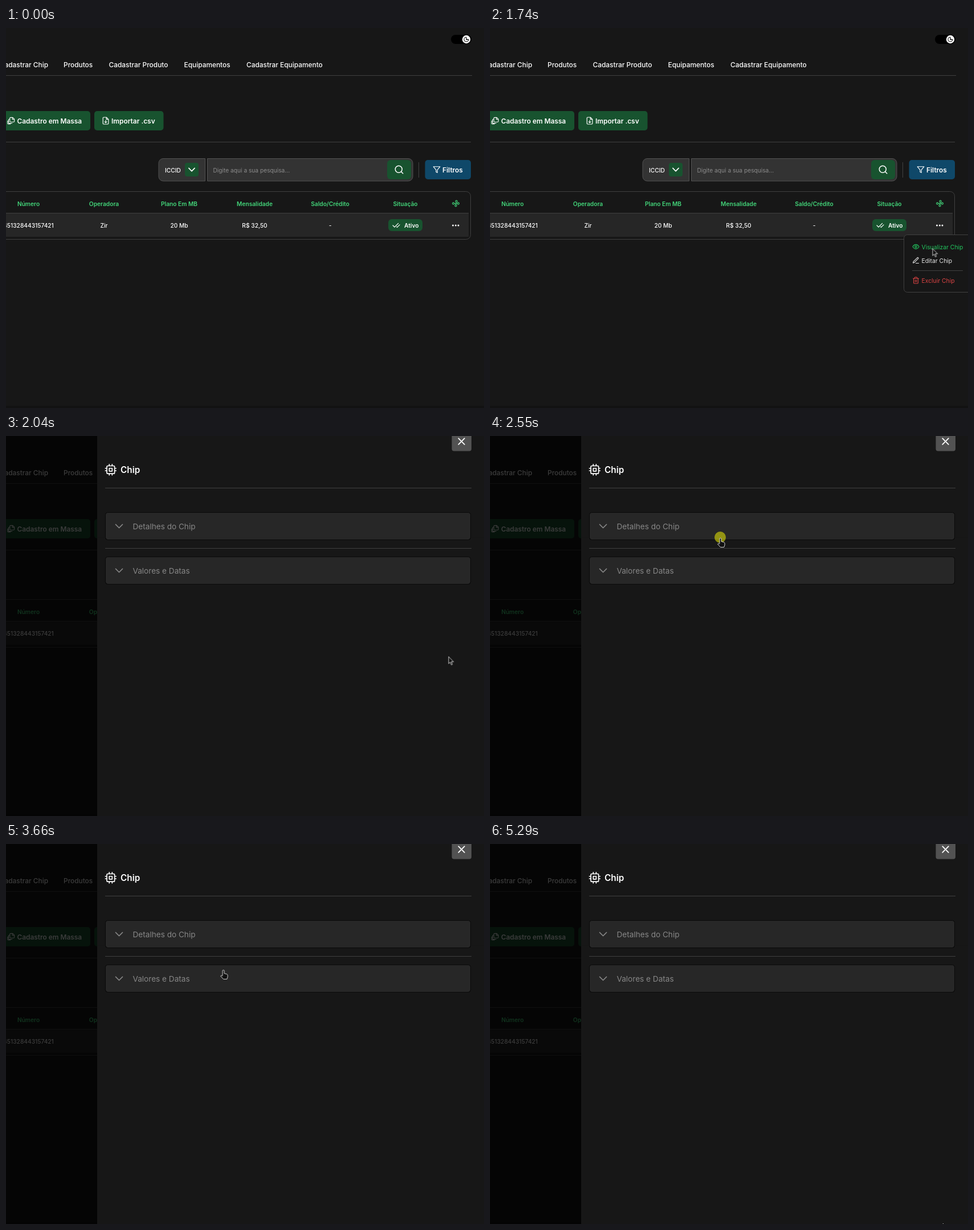
Animation of 839 by 668 pixels, one loop 5360 ms. Source, as an HTML page:

```html
<!DOCTYPE html>
<html lang="pt-BR">
<head>
<meta charset="utf-8">
<title>Chips</title>
<style>
html, body { margin: 0; width: 100%; height: 100%; overflow: hidden; background: #171717; }
svg { display: block; width: 839px; height: 668px; font-family: Inter, sans-serif; }
text { white-space: pre; }
.move { animation: 5.36s linear infinite; }
.flip { animation: 5.36s step-end infinite; }

#cursor { animation-name: cursor; }
@keyframes cursor {
  0%, 2% { transform: translate(797px, 690px); }
  2.05% { transform: translate(795px, 650px); }
  6.5% { transform: translate(767px, 510px); }
  11.01% { transform: translate(797px, 384px); }
  13.5% { transform: translate(799px, 378px); }
  21.08%, 22.39% { transform: translate(787px, 345px); }
  27.43%, 38.1% { transform: translate(776.5px, 387.5px); }
  39.93% { transform: translate(594px, 290px); }
  42.54% { transform: translate(390px, 215px); }
  44.78% { transform: translate(268px, 158px); }
  47.57%, 64.74% { transform: translate(404px, 178px); }
  69.4%, 83.4% { transform: translate(374px, 233px); }
  88.43% { transform: translate(756px, 629px); }
  93.66% { transform: translate(770px, 653px); }
  98.69%, 100% { transform: translate(795px, 667px); }
}
#arrow { animation-name: arrow; }
@keyframes arrow { 0% { opacity: 1; } 43.28% { opacity: 0; } 83.8% { opacity: 1; } }
#hand { animation-name: hand; }
@keyframes hand { 0% { opacity: 0; } 43.28% { opacity: 1; } 83.8% { opacity: 0; } }
#click { animation-name: click; }
@keyframes click {
  0% { opacity: 0; }
  21.08% { opacity: 1; } 22.39% { opacity: 0; }
  30.04% { opacity: 1; } 32.4% { opacity: 0; }
  47.57% { opacity: 1; } 50.19% { opacity: 0; }
  60.82% { opacity: 1; } 63.43% { opacity: 0; }
  70.9% { opacity: 1; } 73.51% { opacity: 0; }
  79.66% { opacity: 1; } 82.09% { opacity: 0; }
}

#menu { animation-name: menu; }
@keyframes menu { 0%, 22.38% { opacity: 0; } 23.7%, 100% { opacity: 1; } }
#view { animation-name: view; }
@keyframes view { 0% { color: #e5e5e5; } 26.12% { color: #22c55e; } 33.2% { color: #e5e5e5; } }

#shade { animation-name: shade; }
@keyframes shade { 0%, 32.6% { opacity: 0; } 33.7% { opacity: .7; } 35.5%, 100% { opacity: .77; } }
#sheet { animation-name: sheet; }
@keyframes sheet {
  0%, 32.6% { transform: translateX(679px); opacity: 0; }
  33.7%, 33.9% { transform: translateX(409px); opacity: .52; }
  35.45% { transform: translateX(120px); opacity: .85; }
  37.6%, 100% { transform: none; opacity: 1; }
}

.details .cover { animation-name: details; }
@keyframes details {
  0%, 50.1% { transform: none; animation-timing-function: ease-out; }
  53.3%, 63.4% { transform: translateY(530px); animation-timing-function: ease-out; }
  67.1%, 100% { transform: none; }
}
.values .cover { animation-name: values; }
@keyframes values {
  0%, 73.4% { transform: none; animation-timing-function: ease-out; }
  76.5%, 82% { transform: translateY(235px); animation-timing-function: ease-out; }
  85.8%, 100% { transform: none; }
}
.details .shut { animation-name: detailsHead; }
@keyframes detailsHead { 0%, 50.1% { opacity: 1; } 52%, 63.4% { opacity: 0; } 65.3%, 100% { opacity: 1; } }
.values .shut { animation-name: valuesHead; }
@keyframes valuesHead { 0%, 73.4% { opacity: 1; } 75.3%, 82% { opacity: 0; } 84%, 100% { opacity: 1; } }
#bar { animation-name: bar; }
@keyframes bar { 0% { opacity: 0; } 51.5% { opacity: 1; } 65% { opacity: 0; } }
</style>
</head>
<body>
<svg id="stage" viewBox="0 0 839 668"></svg>
<script>
const BG = '#171717', LINE = '#404040', GREEN = '#18532f', MINT = '#43d67a';

// y is the middle of the capitals; baselines sit on whole pixels
const text = (x, y, s, size, weight, fill, anchor = 'start') =>
  `<text x="${x}" y="${Math.round(y + size * .364)}" font-size="${size}" font-weight="${weight}" fill="${fill}" text-anchor="${anchor}">${s}</text>`;
const mid = (x, y, s, size, weight, fill) => text(x, y, s, size, weight, fill, 'middle');
const box = (x, y, w, h, r, fill, stroke = 'none') =>
  `<rect x="${x}" y="${y}" width="${w}" height="${h}" rx="${r}" fill="${fill}" stroke="${stroke}"/>`;
const line = (d, color = LINE, w = 1) =>
  `<path d="${d}" fill="none" stroke="${color}" stroke-width="${w}"/>`;
// icons live on a 24 unit grid
const icon = (x, y, k, color, d, w = 2) =>
  `<path transform="translate(${x} ${y}) scale(${k}) translate(-12 -12)" d="${d}" fill="none" stroke="${color}" stroke-width="${w}" stroke-linecap="round" stroke-linejoin="round"/>`;
const ring = (x, y, r) => `M${x + r} ${y}a${r} ${r} 0 1 1-${2 * r} 0 ${r} ${r} 0 0 1 ${2 * r} 0`;

const ICON = {
  down: 'M6 9l6 6 6-6',
  up: 'M6 15l6-6 6 6',
  search: ring(11, 11, 8) + 'M21 21l-4.3-4.3',
  filter: 'M22 3H2l8 9.5V19l4 2v-8.5z',
  copies: 'M10 2h7l5 5v7a2 2 0 0 1-2 2h-10a2 2 0 0 1-2-2V4a2 2 0 0 1 2-2M16 2v6h6M8 7H6a2 2 0 0 0-2 2v9a2 2 0 0 0 2 2h9M4 12H3a2 2 0 0 0-2 2v6a2 2 0 0 0 2 2h7',
  file: 'M14 2H6a2 2 0 0 0-2 2v16a2 2 0 0 0 2 2h12a2 2 0 0 0 2-2V8zM14 2v6h6M12 11v7M9 15l3 3 3-3',
  checks: 'M18 6L7 17l-5-5M22 10l-7.5 7.5L13 16',
  eye: 'M2 12q4-7 10-7t10 7q-4 7-10 7T2 12' + ring(12, 12, 3),
  pen: 'M12 21h9M16.5 3.5a2.1 2.1 0 0 1 3 3L7 19l-4 1 1-4z',
  trash: 'M3 6h18M19 6v14a2 2 0 0 1-2 2H7a2 2 0 0 1-2-2V6M8 6V4a2 2 0 0 1 2-2h4a2 2 0 0 1 2 2v2M10 11v6M14 11v6',
  cpu: 'M6 4h12a2 2 0 0 1 2 2v12a2 2 0 0 1-2 2H6a2 2 0 0 1-2-2V6a2 2 0 0 1 2-2M9 9h6v6H9zM9 1v3M15 1v3M9 20v3M15 20v3M20 9h3M20 14h3M1 9h3M1 14h3',
  nodes: ring(4, 12, 3) + ring(14, 5, 3) + ring(20, 12, 3) + ring(12, 19, 3) + 'M7 12h10M13 8l-1 8',
  close: 'M6 6l12 12M18 6L6 18',
  moon: 'M12 4a6 6 0 0 0 8 8 8 8 0 1 1-8-8M12 9v4h3'
};

const nav = [[101, 'Produtos'], [180.5, 'Cadastrar Produto'], [312.5, 'Equipamentos'], [422, 'Cadastrar Equipamento']];
const columns = [
  [39.5, 'Número', '451328443157421'], [172, 'Operadora', 'Zir'], [304, 'Plano Em MB', '20 Mb'],
  [436.5, 'Mensalidade', 'R$ 32,50'], [569, 'Saldo/Crédito', '-'], [701, 'Situação', '']
];

const page = () =>
  box(0, 0, 839, 668, 0, BG) + box(0, 664, 839, 4, 0, 'rgba(0,0,0,.2)') +
  box(781, 12, 36, 16, 8, '#000') + '<circle cx="808" cy="20" r="7.2" fill="#fff"/>' + icon(808, 20, .5, '#111', ICON.moon, 2.2) +
  text(74, 65, 'Cadastrar Chip', 11.9, 500, '#fff', 'end') +
  nav.map(([x, s]) => text(x, 65, s, 11.9, 500, '#fff')).join('') +
  line('M0 83.5H818M0 200.5H816') +
  box(-40, 146, 188, 34, 5, GREEN) + icon(9, 163, .56, '#fff', ICON.copies) + text(19.5, 163.5, 'Cadastro em Massa', 11.9, 600, '#fff') +
  box(155, 146, 121.5, 34, 5, GREEN) + icon(175, 163, .6, '#fff', ICON.file) + text(185, 163.5, 'Importar .csv', 11.9, 600, '#fff') +
  `<path d="M349.5 229.5H276a8 8 0 0 0-8 8V261a8 8 0 0 0 8 8H349.5zM353.5 229.5H706a8 8 0 0 1 8 8V261a8 8 0 0 1-8 8H353.5z" fill="#333" stroke="#525252"/>` +
  text(279, 250, 'ICCID', 10.2, 500, '#fff') + box(314, 237, 24, 24, 4, GREEN) + icon(326, 249, .85, '#fff', ICON.down) +
  text(363.5, 250, 'Digite aqui a sua pesquisa...', 10.2, 400, '#8c8c8c') +
  box(669, 232, 42, 34, 6, GREEN) + icon(690, 249, .75, '#fff', ICON.search) +
  line('M724.5 236V263') +
  box(735.5, 232, 80.5, 34, 5, '#0f4869') + icon(756, 249, .58, '#fff', ICON.filter) + text(766, 250, 'Filtros', 11.9, 600, '#fff') +
  box(-20, 287.5, 835.5, 84, 8, BG, LINE) + box(0, 326, 812, 41, 0, '#262626') + line('M0 325.5H812') +
  columns.map(([x, head, value]) => mid(x, 309, head, 10.2, 600, MINT) + mid(x, 347, value, 10.2, 500, '#fff')).join('') +
  icon(789.5, 308.5, .54, MINT, ICON.nodes) +
  box(671, 336, 60, 21, 6, GREEN) + icon(685, 347, .6, '#fff', ICON.checks) + text(699, 347, 'Ativo', 10.2, 600, '#fff') +
  [784.5, 789.3, 794].map(x => `<circle cx="${x}" cy="347" r="1.5" fill="#fff"/>`).join('');

const option = (y, s, color, d) => icon(747.5, y - .5, .55, color, d) + text(757.5, y, s, 10.35, 400, color);
const menu = () =>
  `<g id="menu" class="move">${box(726.5, 363.5, 125, 101, 6, BG, LINE)}
  <g id="view" class="flip">${option(385, 'Visualizar Chip', 'currentColor', ICON.eye)}</g>
  ${option(409, 'Editar Chip', '#e5e5e5', ICON.pen)}${line('M741 426.5H830')}
  ${option(444, 'Excluir Chip', '#dc4444', ICON.trash)}</g>`;

const field = (y, col, label, value, wide) => {
  const x = col ? 504.5 : 185.5, w = wide ? 620 : 301;
  return text(x - .5, y, label, 11.9, 600, '#a3a3a3') + box(x, y + 11.5, w, 39, 6, BG, '#363636') +
    mid(x + w / 2, y + 31.5, value, 11.9, 500, '#d9d9d9');
};
const fields = (top, list) =>
  list.map(([label, value, wide], i) => field(top + 77 * (wide ? 5 : i >> 1), wide ? 0 : i & 1, label, value, wide)).join('');

// the cover slides down to reveal the body and carries whatever follows
const section = (name, y, title, body, rest) => {
  const end = y + 48.5, edge = `a4 4 0 0 0 4 4H811.5a4 4 0 0 0 4-4`;
  const head = (fill, ink, d) => box(174.5, y + .5, 641, 48, 4, fill, '#0a0a0a') +
    icon(198.5, y + 24.5, 1, ink, d, 1.7) + text(222.5, y + 24.7, title, 13.6, 400, ink);
  return `<g class="${name}">${box(174.5, y + .5, 641, 700, 4, '#262626', BG)}${body}
    ${head('#0a0a0a', '#fff', ICON.up)}
    <g class="shut move">${head('#272727', '#878787', ICON.down)}</g>
    <g class="cover move"><path d="M160 ${end - 4}H174.5${edge}H839V1400H160z" fill="${BG}"/>
    ${line(`M174.5 ${end - 4}${edge}`, '#0a0a0a')}${rest}</g></g>`;
};

const values = () => section('values', 212, 'Valores e Datas', fields(281, [
  ['Saldo', 'R$ 45,99'], ['Valor de Cancelamento', 'R$ 51,23'],
  ['Data de Compra', '01/05/2025'], ['Data do Cancelamento', '-'],
  ['Data de Ativação', '02/05/2025'], ['Última Comunicação', '-']
]), '');

const details = () => section('details', 134, 'Detalhes do Chip', fields(203, [
  ['ICCID', '8784276187483578627847'], ['Número', '451328443157421'],
  ['Operadora', 'Zir'], ['Status', 'Ativo'],
  ['SMS', 'Sim'], ['Plano em MB', '20 Mb'],
  ['Meses de Fidelidade', '3 Meses'], ['Dias de Carência Estoque', '3 Dias'],
  ['Nome do Fornecedor', 'S.A.'],
  ['Observações', 'Observações Observadas....', true]
]) + box(185.5, 663.5, 620, 34, 8, '#3a3a3a', '#5a5a5a'), line('M174 197.5H817') + values());

const sheet = () =>
  `<g id="sheet" class="move">${box(160, 0, 679, 668, 0, BG)}
  ${details()}
  ${box(782.5, -8, 34.5, 34.5, 4, '#525252')}${icon(799.5, 9.5, .88, '#fff', ICON.close)}
  ${icon(183.8, 59.3, .85, '#fff', ICON.cpu)}${text(201, 59.5, 'Chip', 15.3, 600, '#fff')}${line('M174 91.5H817')}
  <g id="bar" class="flip">${box(830, 0, 9, 668, 0, '#202020')}${box(830, 0, 9, 622.5, 0, '#6b6b6b')}</g></g>`;

const cursor = () =>
  `<g id="cursor" class="move" stroke="#e8e8e8" stroke-width=".9" stroke-linejoin="round">
  <circle id="click" class="flip" r="10" fill="#ff0" fill-opacity=".5" stroke="none"/>
  <path id="arrow" class="flip" d="M.3.3V12.8L3.1 10.1 5.2 14.8 7.1 13.9 5 9.4H9z" fill="#111"/>
  <path id="hand" class="flip" d="M-1 11V3a1.5 1.5 0 0 1 3 0V7.5l4.5 1.2q1.5.5 1.5 2v3l-1.3 3.8H.5L-4.5 12q1-1.8 3-.3z" fill="#111"/></g>`;

document.getElementById('stage').innerHTML =
  page() + menu() + `<g id="shade" class="move">${box(0, 0, 839, 668, 0, '#000')}</g>` + sheet() + cursor();
</script>
</body>
</html>
```
